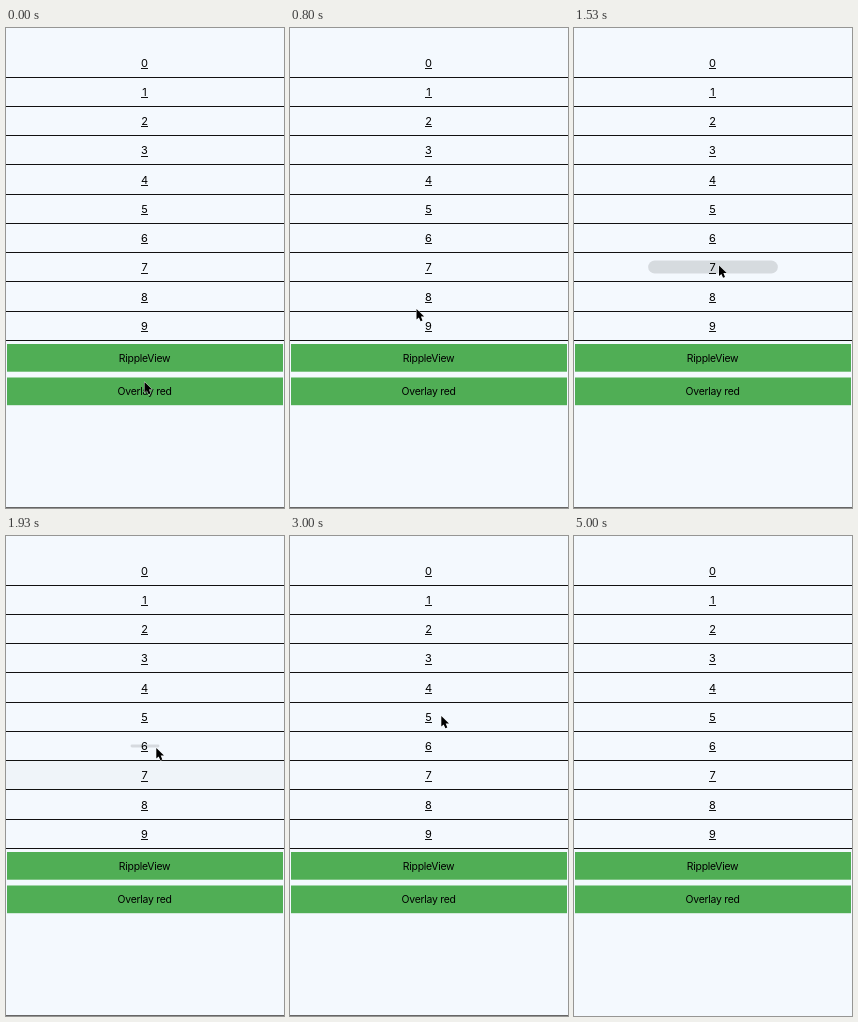
These frames come from a looping animation (278x480 px, 5.47 s). An HTML page:

```html
<!DOCTYPE html>
<html lang="en">
<head>
<meta charset="utf-8">
<title>Ripple list</title>
<style>
  html, body { margin: 0; width: 100%; height: 100%; overflow: hidden; background: #f4f9fe; }
  svg { display: block; width: 278px; height: 480px; }
  text { font: 10.4px Inter, "Liberation Sans", sans-serif; letter-spacing: -.25px; text-anchor: middle; }
  .digit { font-size: 11px; letter-spacing: 0; }
  .button { fill: #50ae55; }
  .rule { fill: #111; }
</style>
</head>
<body>
<svg viewBox="0 0 278 480">
  <g id="boxes"></g>
  <g id="ripples"></g>
  <g id="labels"></g>
  <rect id="edge" y="479" width="278" height="1" fill="#666"/>
  <path id="cursor" d="M0 0V10.6L2.4 8.4L4.1 12.3L6 11.5L4.4 7.6H7.7Z" stroke="#fff" stroke-width=".8" paint-order="stroke"/>
</svg>
<script>
const LOOP = 5470, FRAME = 1000 / 15, GROW = 250, FADE = 210, MAX_SCALE = 1.2;
const ROW = 29.25;
const $ = id => document.getElementById(id);

function add(parent, tag, attrs, text = '') {
  const el = document.createElementNS('http://www.w3.org/2000/svg', tag);
  for (const key in attrs) el.setAttribute(key, attrs[key]);
  el.textContent = text;
  parent.appendChild(el);
  return el;
}

const ruleY = i => Math.round(48.5 + ROW * i);

for (let i = 0; i < 10; i++) {
  const y = 38.5 + ROW * i;
  add($('boxes'), 'rect', { class: 'rule', y: ruleY(i), width: 278, height: 1 });
  add($('labels'), 'text', { class: 'digit', x: 138.5, y }, i);
  add($('labels'), 'rect', { class: 'rule', x: 135, y: Math.round(y + 1.3), width: 7, height: 1 });
}

[['RippleView', 316], ['Overlay red', 349.5]].forEach(([label, y]) => {
  add($('boxes'), 'rect', { class: 'button', x: 1, y, width: 276, height: 27.7 });
  add($('labels'), 'text', { x: 138.6, y: y + 17.7 }, label);
});

function makeRipple(x, y, w, h, fill, alpha, press, release) {
  const id = 'clip' + press;
  const clip = add($('ripples'), 'clipPath', { id });
  add(clip, 'rect', { x, y, width: w, height: h });
  const group = add($('ripples'), 'g', { 'clip-path': `url(#${id})` });
  const pill = add(group, 'rect', { x: -w / 2, y: -h / 2, width: w, height: h, rx: h / 2, fill });
  return { pill, cx: x + w / 2, cy: y + h / 2, alpha, press, release };
}

const rowRipple = (i, press, release) =>
  makeRipple(0, ruleY(i - 1) + 1, 278, ruleY(i) - ruleY(i - 1) - 1, '#000', .12, press, release);

const ripples = [
  makeRipple(1, 349.5, 276, 27.7, '#f00', .14, 158, 440),
  rowRipple(8, 822, 1230),
  rowRipple(7, 1427, 1760),
  rowRipple(6, 1888, 2140)
];

// time, x, y of the pointer tip
const path = [
  [0, 138.5, 354], [200, 137.7, 357], [470, 137.5, 357], [600, 133, 329],
  [733, 127.5, 285], [800, 126.5, 281], [1200, 126.5, 281], [1333, 138, 254],
  [1420, 145, 237.5], [1730, 145, 237.5], [1800, 149, 226], [1867, 150.3, 212],
  [2070, 150.3, 212], [2330, 151.3, 180]
];

const clamp = u => Math.min(1, Math.max(0, u));
const smooth = u => u * u * (3 - 2 * u);

function pointerAt(t) {
  const next = path.findIndex(p => p[0] > t);
  if (next < 0) return path[path.length - 1].slice(1);
  const [t0, x0, y0] = path[next - 1], [t1, x1, y1] = path[next];
  const u = (t - t0) / (t1 - t0);
  return [x0 + (x1 - x0) * u, y0 + (y1 - y0) * u];
}

function draw(t) {
  for (const r of ripples) {
    const scale = MAX_SCALE * smooth(clamp((t - r.press) / GROW));
    r.pill.setAttribute('transform', `translate(${r.cx} ${r.cy}) scale(${scale})`);
    r.pill.setAttribute('opacity', r.alpha * (1 - clamp((t - r.release) / FADE)));
  }
  $('cursor').setAttribute('transform', `translate(${pointerAt(t)})`);
  $('cursor').setAttribute('opacity', t < 4590 ? 1 : t < 4660 ? .5 : 0);
  $('edge').setAttribute('opacity', t < 4330 ? 1 : 0);
}

const start = performance.now();
function tick() {
  const t = (performance.now() - start) % LOOP;
  draw(Math.floor((t + 5) / FRAME) * FRAME); // 15 poses a second
  requestAnimationFrame(tick);
}
tick();
</script>
</body>
</html>
```
